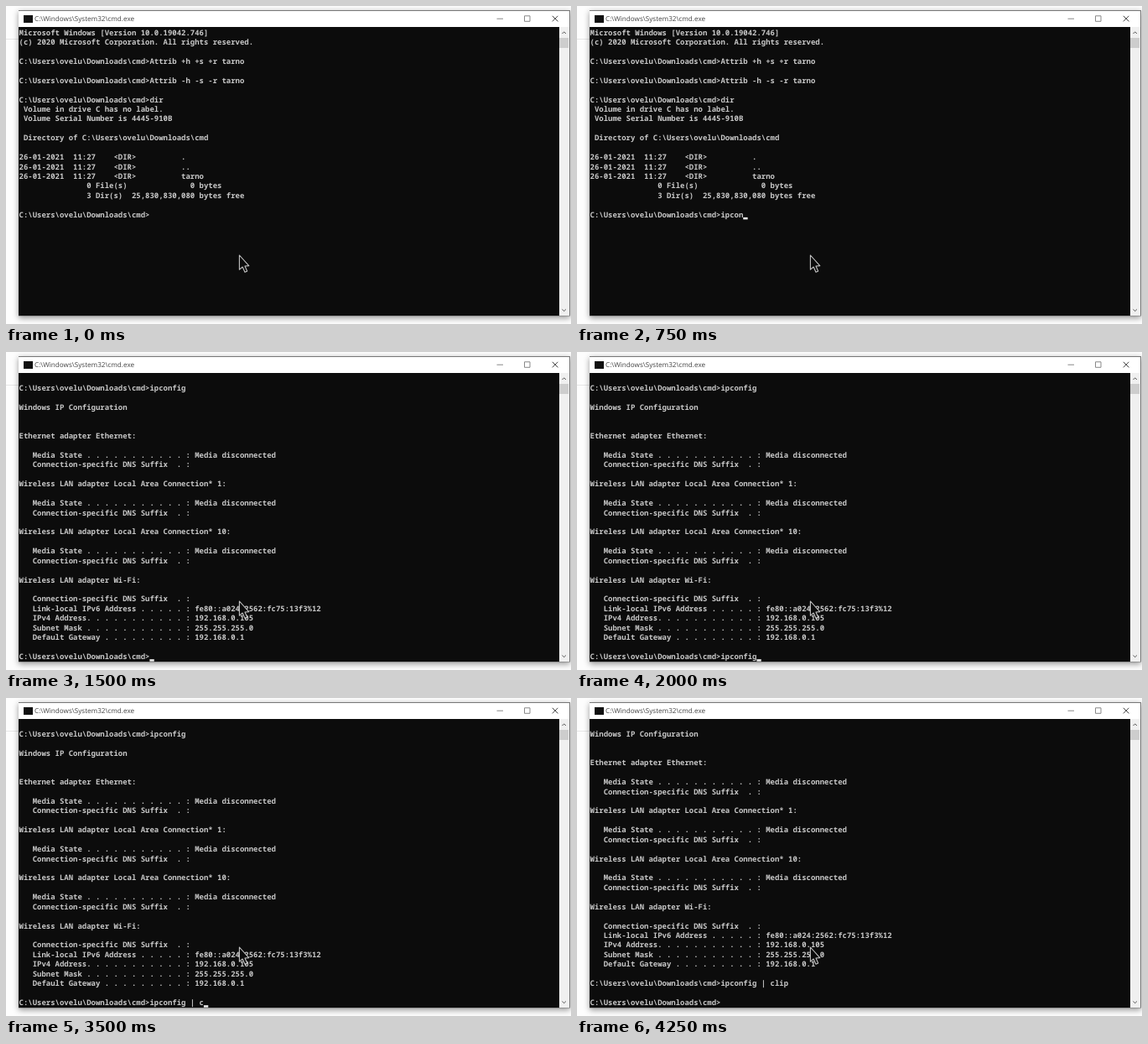
An HTML page with a canvas that plays this animation: 674 px wide and 379 px high, repeating every 4500 ms.

```html
<!DOCTYPE html>
<html lang="en">
<head>
<meta charset="utf-8">
<title>Command prompt</title>
<style>
  html, body { margin: 0; width: 100%; height: 100%; overflow: hidden; background: #fdfdfd; }
  canvas { display: block; width: 674px; height: 379px; }
</style>
</head>
<body>
<canvas id="stage"></canvas>
<script>
const W = 674, H = 379, STEP = 250, LOOP = 4500;
const CELL_W = 5.375, CELL_H = 11.43, LEFT = 15.5, TOP = 26;

const canvas = document.getElementById('stage');
const ratio = window.devicePixelRatio || 1;
canvas.width = W * ratio;
canvas.height = H * ratio;
const ctx = canvas.getContext('2d');
ctx.scale(ratio, ratio);

const folder = 'C:\\Users\\ovelu\\Downloads\\cmd';
const prompt = folder + '>';
const entry = name => '26-01-2021  11:27    <DIR>          ' + name;

// Pads a label with dots up to the colon column.
function field(label, value = '') {
  let s = '   ' + label;
  if (s.length % 2 === 0) s += ' ';
  while (s.length < 37) s += '. ';
  return s + ': ' + value;
}

const listing = [
  'Microsoft Windows [Version 10.0.19042.746]',
  '(c) 2020 Microsoft Corporation. All rights reserved.',
  '',
  prompt + 'Attrib +h +s +r tarno',
  '',
  prompt + 'Attrib -h -s -r tarno',
  '',
  prompt + 'dir',
  ' Volume in drive C has no label.',
  ' Volume Serial Number is 4445-910B',
  '',
  ' Directory of ' + folder,
  '',
  entry('.'),
  entry('..'),
  entry('tarno'),
  ' '.repeat(15) + '0 File(s)' + ' '.repeat(14) + '0 bytes',
  ' '.repeat(15) + '3 Dir(s)  25,830,830,080 bytes free',
  ''
];

const suffix = field('Connection-specific DNS Suffix ');
const offline = name => [
  name + ':', '', field('Media State', 'Media disconnected'), suffix, ''
];

const config = [
  '',
  prompt + 'ipconfig',
  '',
  'Windows IP Configuration',
  '', '',
  ...offline('Ethernet adapter Ethernet'),
  ...offline('Wireless LAN adapter Local Area Connection* 1'),
  ...offline('Wireless LAN adapter Local Area Connection* 10'),
  'Wireless LAN adapter Wi-Fi:',
  '',
  suffix,
  field('Link-local IPv6 Address', 'fe80::a024:2562:fc75:13f3%12'),
  field('IPv4 Address', '192.168.0.105'),
  field('Subnet Mask', '255.255.255.0'),
  field('Default Gateway', '192.168.0.1'),
  ''
];

const copied = ['', ...config.slice(3), prompt + 'ipconfig | clip', ''];

// Input line at each step; a trailing underscore is the caret.
const typing = [
  [listing, ['', 'i_', 'ip', 'ipcon_', 'ipconfig', 'ipconfig_']],
  [config, ['_', '_', 'ipconfig_', 'ipconfig', 'ipconfig', 'ipconfig_',
            'ipconfig |_', 'ipconfig | ', 'ipconfig | c_', 'ipconfig | cli_', 'ipconfig | clip_']],
  [copied, ['']]
];
const states = typing.flatMap(([screen, inputs]) => inputs.map(input => ({ screen, input })));

function rect(x, y, w, h, color) {
  ctx.fillStyle = color;
  ctx.fillRect(x, y, w, h);
}

function line(points, color, width = 1) {
  ctx.beginPath();
  points.forEach(([x, y]) => ctx.lineTo(x, y));
  ctx.strokeStyle = color;
  ctx.lineWidth = width;
  ctx.stroke();
}

function drawWindow() {
  rect(0, 0, W, H, '#fdfdfd');
  rect(0, 39, 15, 1, '#e6e6e6');

  ctx.save();
  ctx.shadowColor = 'rgba(0,0,0,.4)';
  ctx.shadowBlur = 7;
  ctx.shadowOffsetY = 2;
  rect(15, 5, 658, 364.5, '#777');
  ctx.restore();

  rect(15, 6, 657, 19, '#fff');
  rect(15, 25, 645, 344, '#0c0c0c');
  rect(660, 25, 12, 344, '#f0f0f0');
  rect(660, 38, 11, 12, '#cdcdcd');
  line([[663.5, 33], [665.7, 30.8], [667.9, 33]], '#555');
  line([[663.5, 361.5], [665.7, 363.7], [667.9, 361.5]], '#555');

  rect(21, 11, 11, 9, '#111');
  ctx.font = '8.15px "Open Sans", "Noto Sans", sans-serif';
  ctx.fillStyle = '#444';
  ctx.fillText('C:\\Windows\\System32\\cmd.exe', 34, 18.2);

  line([[585.5, 15.2], [593, 15.2]], '#888');
  ctx.strokeRect(618.5, 11.8, 6.5, 6.5);
  line([[651.8, 11.8], [658.4, 18.4]], '#444');
  line([[658.4, 11.8], [651.8, 18.4]], '#444');
}

function drawText(text, row, col = 0) {
  const y = TOP + row * CELL_H + 8.5;
  for (const ch of text) {
    if (ch !== ' ') ctx.fillText(ch, LEFT + col * CELL_W, y);
    col++;
  }
}

function drawConsole({ screen, input }) {
  const caret = input.endsWith('_');
  const typed = caret ? input.slice(0, -1) : input;
  const row = screen.length;
  ctx.font = 'bold 8.96px "Noto Sans Mono", "DejaVu Sans Mono", monospace';
  ctx.fillStyle = '#c8c8c8';
  screen.forEach((text, i) => drawText(text, i));
  drawText(prompt + typed, row);
  if (caret) {
    const x = LEFT + (prompt.length + typed.length) * CELL_W;
    rect(x, TOP + (row + 1) * CELL_H - 2.7, CELL_W, 2.5, '#f2f2f2');
  }
}

function drawPointer() {
  ctx.beginPath();
  [[278.4, 297], [278.4, 314.2], [282.2, 311], [285, 317.2], [287.7, 316],
   [285, 310], [289.8, 309.6]].forEach(([x, y]) => ctx.lineTo(x, y));
  ctx.closePath();
  ctx.fillStyle = '#0c0c0c';
  ctx.fill();
  ctx.strokeStyle = '#c4c4c4';
  ctx.lineWidth = 1.1;
  ctx.lineJoin = 'round';
  ctx.stroke();
}

const start = performance.now();

function draw(now) {
  const time = Math.max(0, now - start) % LOOP;
  ctx.textRendering = 'geometricPrecision';
  drawWindow();
  drawConsole(states[Math.floor(time / STEP)]);
  drawPointer();
  requestAnimationFrame(draw);
}

draw(start);
</script>
</body>
</html>
```
